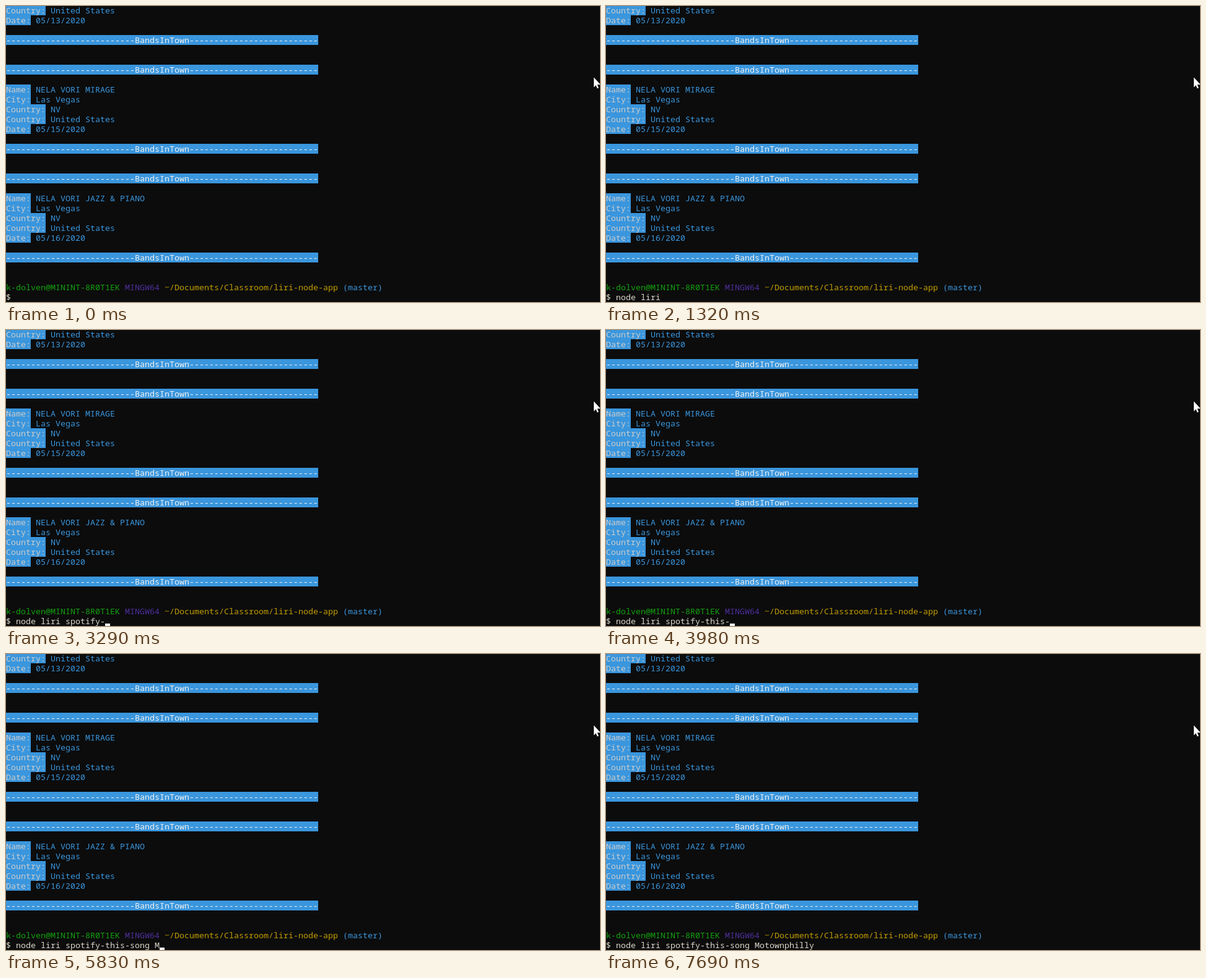
Animation, 959 px wide and 479 px high, one loop 8000 ms. Source, as an HTML page:

```html
<!DOCTYPE html>
<html lang="en">
<head>
<meta charset="utf-8">
<title>Terminal</title>
<style>
  html, body { margin: 0; width: 100%; height: 100%; overflow: hidden; background: #0c0c0c; }
  svg { display: block; }
  text { font: 13.3333px "Noto Sans Mono", "DejaVu Sans Mono", monospace; white-space: pre; }
</style>
</head>
<body>
<svg id="screen" width="959" height="479" viewBox="0 0 959 479"></svg>
<script>
const COL = 8, ROW = 16, LOOP = 8000;
const BLUE = '#3a96dd', GREY = '#cccccc', WHITE = '#f2f2f2', INPUT = '#dcd7cb';
const screen = document.getElementById('screen');

function add(tag, attrs, content = '') {
  const el = document.createElementNS('http://www.w3.org/2000/svg', tag);
  for (const key in attrs) el.setAttribute(key, attrs[key]);
  el.textContent = content;
  return screen.appendChild(el);
}

// The output is written line by line, like a real terminal.
let row = 0;

function write(col, string, fill, back) {
  const x = col * COL, y = row * ROW - 1;
  if (back) add('rect', { x, y, width: string.length * COL, height: ROW, fill: back });
  return add('text', { x, y: y + 13, fill }, string);
}

function field(label, value) {
  write(0, label + ':', GREY, BLUE);
  write(label.length + 2, value, BLUE);
  row++;
}

function divider() {
  const dashes = '-'.repeat(26);
  write(0, dashes + 'BandsInTown' + dashes, WHITE, BLUE);
  row++;
}

function ending(date) {
  field('Country', 'United States');
  field('Date', date);
  row++;
  divider();
  row += 2;
}

function show(name, date) {
  divider();
  row++;
  field('Name', name);
  field('City', 'Las Vegas');
  field('Country', 'NV');
  ending(date);
}

function prompt(...parts) {
  let col = 0;
  for (const [string, fill] of parts) {
    write(col, string, fill);
    col += string.length + 1;
  }
  row++;
}

ending('05/13/2020');
show('NELA VORI MIRAGE', '05/15/2020');
show('NELA VORI JAZZ & PIANO', '05/16/2020');
prompt(
  ['k-dolven@MININT-8R0T1EK', '#13a10e'],
  ['MINGW64', '#4f2f9e'],
  ['~/Documents/Classroom/liri-node-app', '#c19c00'],
  ['(master)', BLUE]
);
write(0, '$', INPUT);

const input = write(2, '', INPUT);
const caret = add('rect', { y: 475, width: COL, height: 4, fill: WHITE });

// Mouse pointer
add('path', { d: 'M949 115.5V131.5L952.4 128.3L954.6 133.4L956.8 132.4L954.7 127.3H960Z', fill: '#fff' });

// Typing: each run starts at a time and presses one key per beat; _ is a beat of rest.
const BEAT = 76;
const runs = {
  80: 'node ', 550: 'liri', 1020: ' ', 2040: 'spo_tify', 3290: '-_this',
  3980: '-__son_g', 5070: ' ', 5830: 'M__o__tow_n', 6920: 'p_hi_l_l_y'
};
const keys = Object.entries(runs).flatMap(([start, run]) =>
  [...run].map((char, i) => ({ char, at: +start + i * BEAT })).filter(key => key.char !== '_'));

// The caret goes dark at these times, until the next key or for one blink.
const BLINK = 550;
const dark = [0, 850, 1320, 2970, 4070, 4520, 5600, 6600, 7690];

function draw(time) {
  const typed = keys.filter(key => key.at <= time);
  const lastKey = typed.length ? typed[typed.length - 1].at : -1;
  const lastDark = Math.max(...dark.filter(at => at <= time));
  const lit = lastKey > lastDark || time - lastDark >= BLINK;
  input.textContent = typed.map(key => key.char).join('');
  caret.setAttribute('x', (2 + typed.length) * COL);
  caret.setAttribute('visibility', lit ? 'visible' : 'hidden');
}

const start = performance.now();
function tick() {
  draw(Math.max(0, performance.now() - start) % LOOP);
  requestAnimationFrame(tick);
}
tick();
</script>
</body>
</html>
```
